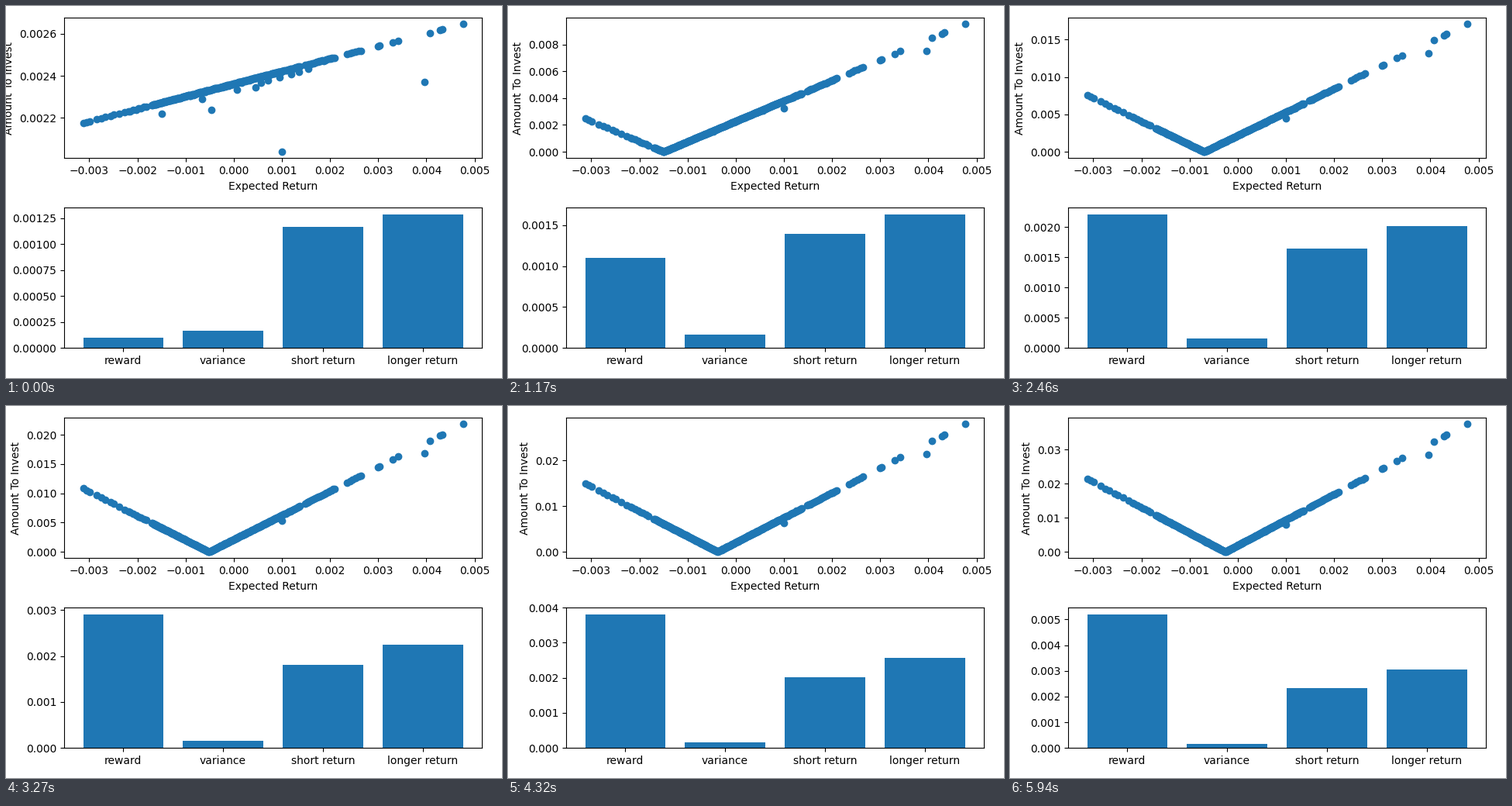
A matplotlib script that plays this animation: 640 by 480 pixels, repeating every 5970 ms.

```python
import matplotlib.pyplot as plt
import numpy as np
from matplotlib.animation import FuncAnimation

W, H, DPI = 640, 480, 100
FRAMES, INTERVAL = 199, 30
LAYOUT_STEP = 144  # step whose labels define the margins
MARGIN = 0.05

rng = np.random.default_rng(4)


def spread(lo, hi, n):
    """Evenly spaced values from lo to hi with jitter between the ends."""
    jitter = rng.uniform(-0.3, 0.3, n) * (hi - lo) / n
    jitter[[0, -1]] = 0
    return np.linspace(lo, hi, n) + jitter


def make_returns():
    """Expected returns in thousandths: dense middle, thinning tails."""
    runs = [(-3.127, -2.99, 3), (-2.84, -2.38, 6), (-2.26, -1.82, 9),
            (-1.70, 1.0, 230), (1.0, 1.37, 16), (1.48, 2.1, 22),
            (2.35, 2.64, 6), (2.99, 3.02, 2), (3.30, 3.42, 2),
            (4.28, 4.33, 2)]
    return np.concatenate([spread(*r) for r in runs] + [[4.07, 4.759]])


def make_shortfalls(n):
    """Points below the line as returns (1e-3) and depths (1e-6)."""
    main_r, main_d = [1.0, 3.96, -0.47, -1.5, 0.46], [383, 230, 95, 54, 45]
    small_r = np.concatenate([[-0.65, 0.07], spread(0.56, 1.55, 6)])
    depth = np.concatenate([rng.exponential(1, n), main_d,
                            np.linspace(34, 22, small_r.size)])
    return np.concatenate([main_r, small_r]), depth


core = make_returns()
dip_r, depth = make_shortfalls(core.size)
ret = np.concatenate([core, dip_r])
x = ret * 1e-3
gap = depth * 1e-6
growth = 0.016 * gap * (ret - 0.15)

names = ["reward", "variance", "short return", "longer return"]
start = np.array([1e-4, 1.65e-4, 1.168e-3, 1.29e-3])
rate = np.array([2.577e-5, -6e-8, 5.88e-6, 8.83e-6])


def invest(k):
    slope = 0.0596 + 0.0375 * k
    base = 0.002363 - 2.18e-6 * k
    return np.abs(base + slope * x - gap - growth * k)


def padded(v):
    pad = MARGIN * np.ptp(v)
    return v.min() - pad, v.max() + pad


fig, (ax_pts, ax_bar) = plt.subplots(2, 1, figsize=(W / DPI, H / DPI), dpi=DPI)
dots = ax_pts.scatter(x, invest(0))
ax_pts.set_xlim(padded(x))
ax_pts.set_xlabel("Expected Return")
ax_pts.set_ylabel("Amount To Invest")
bars = ax_bar.bar(names, start)


def update(k):
    y = invest(k)
    dots.set_offsets(np.column_stack([x, y]))
    ax_pts.set_ylim(padded(y))

    weights = start + rate * k
    for bar, w in zip(bars, weights):
        bar.set_height(w)
    ax_bar.set_ylim(0, weights.max() * (1 + MARGIN))
    return dots, *bars


update(LAYOUT_STEP)
fig.tight_layout()

anim = FuncAnimation(fig, update, frames=FRAMES, interval=INTERVAL,
                     repeat=True, repeat_delay=0, blit=False)
plt.show()
```
